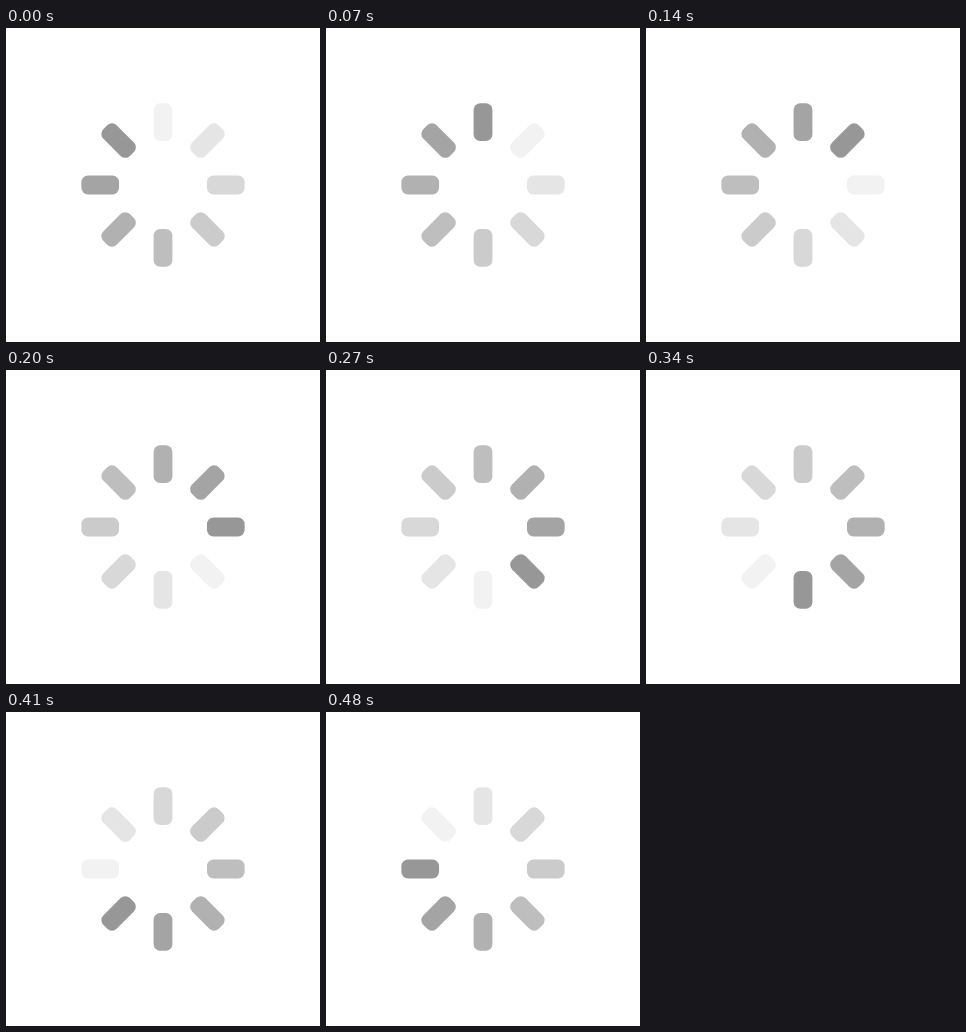
Write an HTML page that moves like this. It is 314 by 314 pixels and loops after 0.54 s.

```html
<!DOCTYPE html>
<html lang="en">
<head>
<meta charset="utf-8">
<title>Spinner</title>
<style>
  html, body { margin: 0; width: 100%; height: 100%; overflow: hidden; background: #fff; }
  svg { display: block; width: 100%; height: 100%; }
</style>
</head>
<body>
<svg viewBox="0 0 100 100"></svg>
<script>
const BARS = 8;
const LOOP = 540;
const STEP_STARTS = [0, 70, 140, 200, 270, 340, 410, 480];

const svg = document.querySelector('svg');
const bars = Array.from({ length: BARS }, (_, i) => {
  const bar = document.createElementNS('http://www.w3.org/2000/svg', 'rect');
  const attributes = {
    x: 47, y: 24, width: 6, height: 12, rx: 2.1,
    transform: `rotate(${i * 360 / BARS} 50 50)`
  };
  for (const [name, value] of Object.entries(attributes)) bar.setAttribute(name, value);
  return svg.appendChild(bar);
});

// The lightest bar moves clockwise one place per step; shades darken after it.
function draw(time) {
  const step = STEP_STARTS.findLastIndex(start => start <= time % LOOP);
  bars.forEach((bar, i) => {
    const gray = 242 - 13 * ((i - step + BARS) % BARS);
    bar.setAttribute('fill', `rgb(${gray}, ${gray}, ${gray})`);
  });
}

let startTime;
function tick(now) {
  startTime ??= now;
  draw(now - startTime);
  requestAnimationFrame(tick);
}
draw(0);
requestAnimationFrame(tick);
</script>
</body>
</html>
```
